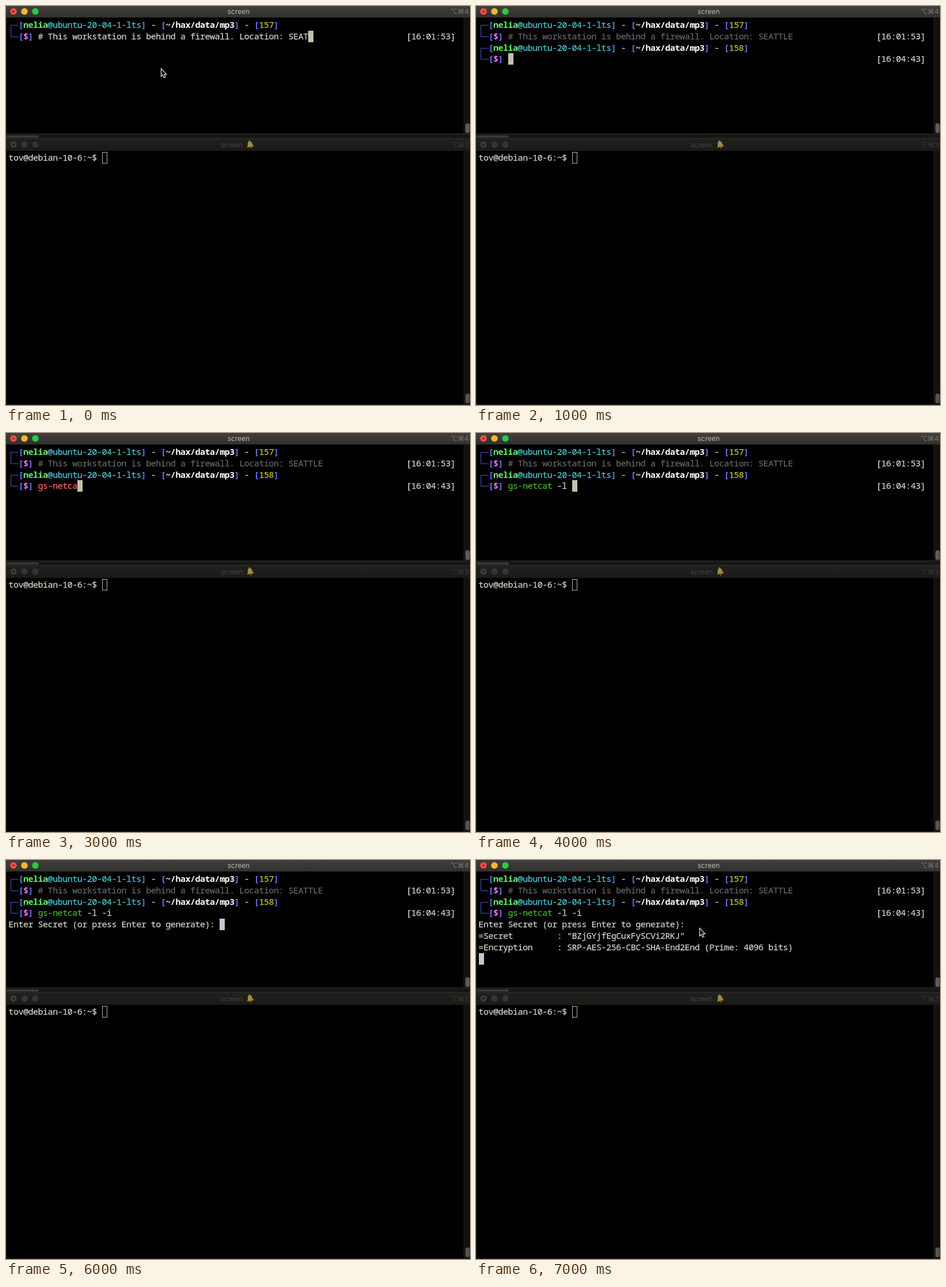
Recreate the animation shown at these times as an HTML page with a canvas. Size 806x694 px, loop 8000 ms.

```html
<!DOCTYPE html>
<html lang="en">
<head>
<meta charset="utf-8">
<title>Two terminals</title>
<style>
html, body { margin: 0; width: 100%; height: 100%; overflow: hidden; background: #000; }
canvas { display: block; }
</style>
</head>
<body>
<canvas id="stage" width="806" height="694"></canvas>
<script>
const ctx = document.getElementById('stage').getContext('2d');

const LOOP = 8000;
const CELL = 8.53, ROW = 19.86, LEFT = 4.6, TOP = 22.9;
const MONO = '15px "Noto Sans Mono", monospace';
const SANS = 'Inter, "DejaVu Sans", sans-serif';
const COLOR = {
  text: '#d2d2c8', dim: '#66666a', blue: '#6a74fa', frame: '#4c54bc',
  green: '#5ff967', cyan: '#4cc7d2', yellow: '#c8c42c', pink: '#ff77ff',
  white: '#ffffff', bad: '#f4695c', good: '#3fb52a'
};
const COMMENT = '# This workstation is behind a firewall. Location: ';
const ASK = 'Enter Secret (or press Enter to generate): ';

const colX = col => LEFT + col * CELL;
const rowY = row => Math.round(TOP + row * ROW);

function rect(x, y, w, h, color) {
  ctx.fillStyle = color;
  ctx.fillRect(x, y, w, h);
}

function pill(x, y, w, h, r, color) {
  ctx.fillStyle = color;
  ctx.beginPath();
  ctx.roundRect(x, y, w, h, r);
  ctx.fill();
}

function disc(x, y, r, color) {
  ctx.fillStyle = color;
  ctx.beginPath();
  ctx.arc(x, y, r, 0, Math.PI * 2);
  ctx.fill();
}

// Terminal text sits on a fixed character grid; returns the next column.
// A hairline stroke gives the glyphs their slightly heavy rendering.
function print(col, y, text, color = COLOR.text, bold = false) {
  ctx.font = (bold ? 'bold ' : '') + MONO;
  ctx.textAlign = 'center';
  ctx.textBaseline = 'alphabetic';
  ctx.fillStyle = ctx.strokeStyle = color;
  ctx.lineWidth = 0.25;
  for (const ch of text) {
    const x = colX(col++) + CELL / 2;
    ctx.fillText(ch, x, y + 15);
    if (!bold) ctx.strokeText(ch, x, y + 15);
  }
  return col;
}

function printParts(col, y, parts) {
  for (const part of parts) col = print(col, y, ...part);
  return col;
}

function prompt(row, count, time) {
  const y = rowY(row), next = rowY(row + 1);
  ctx.strokeStyle = COLOR.frame;
  ctx.lineWidth = 1;
  ctx.beginPath();
  ctx.moveTo(colX(2), y + 10.5);
  ctx.lineTo(8.5, y + 10.5);
  ctx.lineTo(8.5, next + 10.5);
  ctx.lineTo(colX(2), next + 10.5);
  ctx.stroke();

  const { blue, green, cyan, white, yellow, pink, text } = COLOR;
  printParts(2, y, [
    ['[', blue, true], ['nelia', green, true], ['@ubuntu-20-04-1-lts', cyan],
    [']', blue, true], [' - ', text], ['[', blue, true],
    ['~/hax/data/mp3', white, true], [']', blue, true], [' - ', text],
    ['[', blue, true], [count, yellow], [']', blue, true]
  ]);
  printParts(2, next, [['[', blue, true], ['$', pink, true], [']', blue, true]]);
  print(81, next, `[${time}]`);
}

function block(col, row, color) {
  rect(Math.round(colX(col)), rowY(row), 9, 20, color);
}

function pointer(x, y) {
  ctx.save();
  ctx.translate(x, y);
  ctx.beginPath();
  ctx.moveTo(0.5, 0.5);
  for (const [px, py] of [[0.5, 14], [3.4, 11.2], [5.6, 16.2], [8, 15.2], [5.9, 10.3], [9.8, 10.3]])
    ctx.lineTo(px, py);
  ctx.closePath();
  ctx.fillStyle = '#000';
  ctx.fill();
  ctx.strokeStyle = '#e4e4e4';
  ctx.lineWidth = 1.2;
  ctx.stroke();
  ctx.restore();
}

function titleBar(y, h, shades, lights, titleColor, keyColor, keys, titleX) {
  const fill = ctx.createLinearGradient(0, y, 0, y + h);
  shades.forEach((shade, i) => fill.addColorStop(i / (shades.length - 1), shade));
  rect(0, y, 806, h, fill);
  const mid = y + h / 2 - 0.5;
  lights.forEach((color, i) => disc(13 + i * 19, mid, 5.7, color));
  ctx.textBaseline = 'middle';
  ctx.textAlign = 'center';
  ctx.fillStyle = titleColor;
  ctx.font = '12px ' + SANS;
  ctx.fillText('screen', titleX, mid + 1);
  ctx.textAlign = 'right';
  ctx.fillStyle = keyColor;
  ctx.fillText(keys, 804, mid + 1);
}

function bell(x, y) {
  ctx.save();
  ctx.translate(x, y);
  ctx.rotate(-0.2);
  ctx.fillStyle = '#a08a3c';
  ctx.beginPath();
  ctx.moveTo(-6.5, 4);
  ctx.quadraticCurveTo(-4, 2, -4, -1);
  ctx.bezierCurveTo(-4, -7.5, 4, -7.5, 4, -1);
  ctx.quadraticCurveTo(4, 2, 6.5, 4);
  ctx.closePath();
  ctx.fill();
  disc(0, -6, 1.3, '#a08a3c');
  disc(0.5, 5, 1.8, '#6e5c24');
  ctx.restore();
}

function windows() {
  rect(0, 0, 806, 694, '#000');
  rect(795, 20, 11, 674, '#11110e');
  rect(795, 20, 1, 674, '#22221c');
  pill(798, 204, 7.5, 17, 3.7, '#5c5c5c');
  pill(798, 674, 7.5, 17, 3.7, '#545454');

  titleBar(0, 20, ['#404042', '#383836', '#30302d'], ['#fc4d48', '#f8b52b', '#2dc63f'],
    '#b8b8b4', '#747470', '⌥⌘4', 404);
  disc(13, 9.5, 1.6, '#7a100c');

  rect(0, 222, 806, 9, '#171715');
  rect(0, 222, 806, 1, '#30302d');
  rect(0, 230, 806, 1, '#30302d');
  pill(0, 225, 57, 4, 2, '#383836');

  titleBar(231, 21, ['#20201f', '#1a1a17'], ['#3a3a38', '#343432', '#343432'],
    '#444442', '#383835', '⌥⌘3', 392);
  disc(13, 241, 1.6, '#121210');
  bell(424, 241);

  rect(0, 20, 1, 674, '#242421');
  rect(0, 693, 806, 1, '#242421');

  print(0, 254, 'tov@debian-10-6:~$');
  ctx.strokeStyle = '#b4b4a8';
  ctx.lineWidth = 1;
  ctx.strokeRect(167.5, 254.5, 8, 19);
}

function draw(time) {
  const step = Math.floor(time / 1000);
  const warm = '#c2c2ae', cool = '#c6c6d2';
  windows();
  prompt(0, '157', '16:01:53');

  if (step === 0) {
    block(print(6, rowY(1), COMMENT + 'SEAT'), 1, warm);
    pointer(269, 108.5);
    return;
  }

  print(6, rowY(1), COMMENT + 'SEATTLE', COLOR.dim);
  prompt(2, '158', '16:04:43');

  let col = 6;
  if (step === 3) col = print(col, rowY(3), 'gs-netca', COLOR.bad);
  if (step >= 4) {
    col = print(col, rowY(3), 'gs-netcat', COLOR.good);
    col = print(col, rowY(3), step === 4 ? ' -l ' : ' -l -i');
  }
  if (step < 5) {
    block(col, 3, warm);
    return;
  }

  col = print(0, rowY(4), ASK);
  if (step < 7) {
    block(col, 4, cool);
    return;
  }
  print(0, rowY(5), '=Secret         : "BZjGYjfEgCuxFySCVi2RKJ"');
  print(0, rowY(6), '=Encryption     : SRP-AES-256-CBC-SHA-End2End (Prime: 4096 bits)');
  block(0, 7, cool);
  pointer(388, 118);
}

const start = performance.now();
function tick() {
  draw((performance.now() - start) % LOOP);
  requestAnimationFrame(tick);
}
tick();
</script>
</body>
</html>
```
